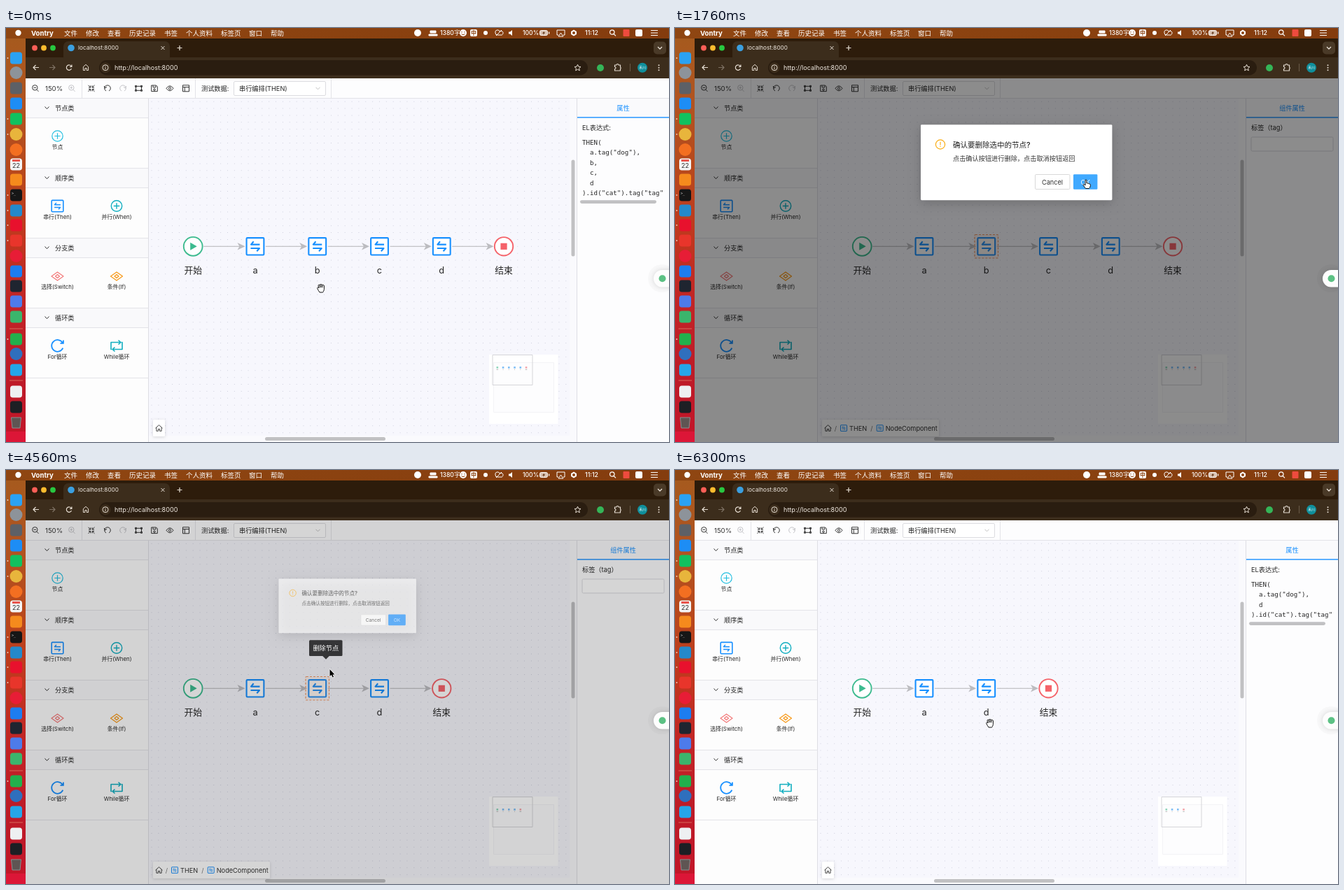
These frames come from a looping animation (947x592 px, 6330 ms). An HTML page with a canvas:

```html
<!DOCTYPE html>
<html lang="zh">
<head>
<meta charset="utf-8">
<title>Flow editor</title>
<style>
html, body { margin: 0; width: 100%; height: 100%; overflow: hidden; background: #fff; }
canvas { display: block; width: 947px; height: 592px; }
</style>
</head>
<body>
<canvas id="stage"></canvas>
<script>
const W = 947, H = 592, LOOP = 6330;
const canvas = document.getElementById('stage');
const ctx = canvas.getContext('2d');
const dpr = window.devicePixelRatio || 1;
canvas.width = W * dpr;
canvas.height = H * dpr;

const SANS = 'Inter, "Noto Sans CJK SC", "Noto Sans CJK", sans-serif';
const MONO = '"DejaVu Sans Mono", monospace';
const BLUE = '#1890ff', INK = '#262626', RULE = '#e3e3e8', TEAL = '#12aec0';

// ---------- drawing helpers ----------
function text(s, x, y, size, color = INK, { weight = 400, align = 'left', font = SANS } = {}) {
  ctx.font = `${weight} ${size}px ${font}`;
  ctx.textAlign = align;
  ctx.fillStyle = color;
  ctx.fillText(s, x, y + size * 0.37);
}
function rect(x, y, w, h, color) {
  ctx.fillStyle = color;
  ctx.fillRect(x, y, w, h);
}
function box(x, y, w, h, r, fill, stroke, lw = 1) {
  ctx.beginPath();
  ctx.roundRect(x, y, w, h, r);
  if (fill) { ctx.fillStyle = fill; ctx.fill(); }
  if (stroke) { ctx.strokeStyle = stroke; ctx.lineWidth = lw; ctx.stroke(); }
}
function circle(x, y, r, fill, stroke, lw = 1) {
  ctx.beginPath();
  ctx.arc(x, y, r, 0, 7);
  if (fill) { ctx.fillStyle = fill; ctx.fill(); }
  if (stroke) { ctx.strokeStyle = stroke; ctx.lineWidth = lw; ctx.stroke(); }
}
function icon(d, x, y, stroke, lw = 1, fill) {
  const p = new Path2D(d);
  ctx.save();
  ctx.translate(x, y);
  ctx.lineJoin = 'round';
  if (fill) { ctx.fillStyle = fill; ctx.fill(p); }
  if (stroke) { ctx.strokeStyle = stroke; ctx.lineWidth = lw; ctx.stroke(p); }
  ctx.restore();
}
function shadow(color, blur, dy, draw) {
  ctx.save();
  ctx.shadowColor = color;
  ctx.shadowBlur = blur * dpr;
  ctx.shadowOffsetY = dy * dpr;
  draw();
  ctx.restore();
}
function gradient(x0, y0, x1, y1, stops) {
  const g = ctx.createLinearGradient(x0, y0, x1, y1);
  stops.forEach((c, i) => g.addColorStop(i / (stops.length - 1), c));
  return g;
}

// ---------- timing helpers ----------
const clamp = v => Math.max(0, Math.min(1, v));
const smooth = v => v * v * (3 - 2 * v);
const within = (t, spans) => spans.some(([a, b]) => t >= a && t < b);
function bezier(x1, y1, x2, y2) {
  const at = (a, b, u) => 3 * (1 - u) ** 2 * u * a + 3 * (1 - u) * u * u * b + u ** 3;
  return x => {
    let lo = 0, hi = 1;
    for (let i = 0; i < 20; i++) {
      const mid = (lo + hi) / 2;
      if (at(x1, x2, mid) < x) lo = mid; else hi = mid;
    }
    return at(y1, y2, lo);
  };
}
const circOut = bezier(0.08, 0.82, 0.17, 1);
const circInOut = bezier(0.78, 0.14, 0.15, 0.86);

// ---------- timeline ----------
const DIALOGS = [{ open: 1080, close: 2115 }, { open: 4450, close: 5375 }];
const HOVERS = [[360, 1040], [3020, 4420], [6090, 6225]];
const TOOLTIP = [4180, 4680];
const PATH = [
  [0, 450, 372], [100, 450, 372], [630, 459.5, 292], [1300, 459.5, 292], [1580, 513, 265],
  [1750, 587, 218], [1930, 588, 217], [2740, 588, 217], [3160, 455, 302], [3300, 455, 302],
  [3530, 462, 299], [3700, 462, 299], [3860, 459, 292], [4000, 459, 292], [4180, 462.5, 285],
  [4680, 462.5, 285], [5180, 584, 225], [5500, 584, 225], [5980, 512, 281], [6100, 458, 312],
  [6300, 450, 362], [LOOP, 450, 362]
];
const POINTERS = [
  [0, 'grab'], [560, 'hand'], [1040, 'arrow'], [1710, 'hand'], [2400, 'grab'], [3790, 'hand'],
  [4430, 'arrow'], [5080, 'hand'], [5580, 'arrow'], [5680, 'grab']
];
function cursorAt(t) {
  const i = Math.max(1, PATH.findIndex(k => k[0] > t));
  const [t0, x0, y0] = PATH[i - 1], [t1, x1, y1] = PATH[i];
  const p = smooth(clamp((t - t0) / (t1 - t0)));
  const kind = POINTERS.filter(k => k[0] <= t).pop()[1];
  return { x: x0 + (x1 - x0) * p, y: y0 + (y1 - y0) * p, kind };
}
function dialogAt(t) {
  const d = DIALOGS.find(d => t >= d.open && t < d.close + 300);
  if (!d) return null;
  if (t >= d.close) {
    const p = (t - d.close) / 300;
    return { mask: 1 - p, zoom: 1 - circInOut(p), focus: 1 };
  }
  return {
    mask: clamp((t - d.open) / 300),
    zoom: circOut(clamp((t - d.open - 75) / 300)),
    focus: clamp((t - d.open - 250) / 150)
  };
}

// ---------- desktop ----------
const MENUS = [['文件', 83], ['修改', 114], ['查看', 145], ['历史记录', 176], ['书签', 226],
  ['个人资料', 257], ['标签页', 307], ['窗口', 347], ['帮助', 378]];
function menuBar() {
  rect(0, 0, W, 15, gradient(0, 0, W, 0, ['#8f4612', '#8b4210', '#843c0e']));
  circle(17.5, 7, 4.2, '#fff');
  text('Vontry', 36, 7.2, 9.6, '#fff', { weight: 700 });
  for (const [label, x] of MENUS) text(label, x, 7, 9.5, '#fff', { weight: 500 });
  circle(588, 7, 5, '#fff');
  icon('M-4-3H4V0H-4ZM-6 2H6V4H-6Z', 610, 7, '#fff', 1, '#fff');
  text('1380字', 620, 7, 8.6, '#fff', { weight: 500 });
  circle(653, 7, 5, '#fff');
  icon('M-2-2V-.5M2-2V-.5M-2.5 1.5Q0 4 2.5 1.5', 653, 7, '#8b4210');
  box(663, 2, 10, 10, 2, '#fff');
  text('中', 668, 7, 8, '#8b4210', { align: 'center', weight: 700 });
  circle(685, 7, 3, '#fff');
  icon('M-5 0A3 3 0 0 1 1-2A3 3 0 1 1 2 3H-2A3 3 0 0 1-5 0M-4 4L4-4', 704, 7, '#fff');
  icon('M-3-1.5H-1L2-4V4L-1 1.5H-3Z', 721, 7, null, 1, '#fff');
  text('100%', 738, 7, 8.6, '#fff', { weight: 500 });
  box(762.5, 3.5, 11, 7, 2, '#d9c2b2', '#fff');
  icon('M1-3L-2 .7H0L-1 3.5L2-.7H0Z', 768, 7, null, 1, '#5a2c0c');
  rect(775, 5.5, 1.3, 3, '#fff');
  icon('M-3 3H-5V-4H6V3H4M-3 5L.5 0L4 5Z', 792, 7, '#fff');
  icon('M-4-2L0-4.5L4-2V2L0 4.5L-4 2Z', 811, 7, null, 1, '#fff');
  circle(811, 7, 2, '#8b4210');
  text('11:12', 827, 7, 8.8, '#fff', { weight: 500 });
  icon('M2-1A3.2 3.2 0 1 1-4.4-1A3.2 3.2 0 1 1 2-1M1 1.4L4 4.4', 867, 7, '#fff', 1.2);
  box(881.5, 2, 9, 10, 1, '#ee4b3e');
  box(899, 2, 10, 10, 2, '#fff');
  icon('M-5-3.5H5M-5 0H5M-5 3.5H5', 926, 7, '#fff', 1.2);
}

const DOCK = [
  [43, '#2ba2f3'], [64, '#8d939a', 1], [86, '#5d6066'], [108, '#1d8df5'], [130, '#11c15f'],
  [152, '#e8b53c', 1], [174, '#f36f21', 1], [195, '#f4f4f4'], [217, '#f58a1d'], [239, '#161616'],
  [261, '#2489ca'], [282, '#e8112d'], [304, '#e8352b'], [326, '#e71d36', 1], [348, '#1c7df0'],
  [369, '#1f2530'], [391, '#4d7bea'], [413, '#3bb56c'], [445, '#22b04c'], [466, '#2f6fbd', 1],
  [489, '#25a6e8'], [520, '#eef0f2'], [542, '#1d1f24']
];
function dock() {
  rect(0, 15, 28, H - 15, gradient(0, 15, 0, H,
    ['#a65a1e', '#b25320', '#b8481c', '#c0361f', '#c22326', '#bd1b28', '#c31529']));
  rect(0, 577, 28, 15, '#dc1637');
  for (const [y, color, round] of DOCK) {
    if (round) circle(14.5, y, 9, color);
    else box(6, y - 8.5, 17, 17, 3.8, color);
  }
  rect(9, 188, 11, 3, '#e8554d');
  text('22', 14.5, 197, 9, '#333', { align: 'center' });
  text('>_', 8, 236, 5, '#eee', { font: MONO });
  icon('M-7-7H7L5.5 8H-5.5Z', 14.5, 564, '#8a8f90', 1, '#5f5553');
  rect(5, 429.5, 19, 1, '#d96b5d');
  rect(5, 503.5, 19, 1, '#d96b5d');
  for (const y of [43, 130, 152, 239, 261, 282, 304, 445]) circle(2.5, y, 0.9, '#f3d6c8');
}

function browser() {
  rect(28, 15, W - 28, 28, '#2d1c0b');
  rect(28, 42, W - 28, 30, '#3c2d1c');
  box(82, 19, 152, 30, 7, '#3c2d1c');
  ['#ff5f57', '#febc2e', '#28c840'].forEach((c, i) => circle(41 + i * 13, 28.5, 3.9, c));
  circle(93, 28.5, 4.8, '#3b9fe0');
  text('localhost:8000', 103, 28.3, 8.2, '#f3ece4');
  icon('M-2.5-2.5L2.5 2.5M2.5-2.5L-2.5 2.5', 224, 28.5, '#e8e0d6');
  icon('M-3.5 0H3.5M0-3.5V3.5', 248, 28.5, '#e8e0d6', 1.2);
  box(925, 19.5, 18, 18, 5, '#4a3a28');
  icon('M-3-1.5L0 1.5L3-1.5', 934, 28.5, '#f0e8de', 1.2);
  const light = '#e6ddd2';
  icon('M4 0H-4M-.5-3.5L-4 0L-.5 3.5', 43, 56.5, light, 1.2);
  icon('M-4 0H4M.5-3.5L4 0L.5 3.5', 66, 56.5, '#7d7062', 1.2);
  icon('M3.4-1.5A3.7 3.7 0 1 0 3.5 1.5M3.9-4V-1H1', 90, 56.5, light, 1.2);
  icon('M-3.6 4V-1L0-4.2L3.6-1V4H1.2V1H-1.2V4Z', 114, 56.5, light);
  box(133, 46, 698, 21.5, 10.7, '#2a1d10');
  circle(142, 56.7, 7.5, '#3c2d1c');
  circle(142, 56.7, 4, null, light);
  icon('M0-.5V2.2M0-2.3V-1.3', 142, 56.7, light);
  text('http://localhost:8000', 155, 56.6, 9.1, '#f3ece4');
  icon('M0-4.5L1.3-1.5L4.5-1.2L2.1 1L2.8 4.2L0 2.5L-2.8 4.2L-2.1 1L-4.5-1.2L-1.3-1.5Z', 816.5, 56.7, light);
  circle(849, 57, 5, '#35b558');
  icon('M-4-3H-1.5A1.5 1.5 0 0 1 1.5-3H4V0A1.5 1.5 0 0 1 4 2.5V5H-4V2.5A1.5 1.5 0 0 0-4-.5Z', 873.5, 56, light, 1.2);
  rect(891, 51, 1, 11, '#6a5a48');
  circle(909, 56.7, 7, '#0f8f9c');
  text('禾川', 909, 56.5, 5, '#fff', { align: 'center' });
  for (const dy of [-3.5, 0, 3.5]) circle(932.5, 56.7 + dy, 1, light);
}

// ---------- page ----------
const SWAP = 'M6.5-2.7H-6L-2.3-7M-6.5 2.7H6L2.3 7';
const SMALL_SWAP = 'M4.4-1.8H-4L-1.6-4.6M-4.4 1.8H4L1.6 4.6';
const MAGNIFIER = 'M3-1A3.7 3.7 0 1 1-4.4-1A3.7 3.7 0 1 1 3-1M2 2L4.5 4.5M-2.5-1H1.1';
const HOME = 'M-5 0L0-4.6L5 0M-3.6-1V4H-1V1.2H1V4H3.6V-1';
const DIAMOND = 'M-8.5 0L0-6L8.5 0L0 6ZM-3 0L0-2.4L3 0L0 2.4Z';

function toolbar() {
  rect(28, 72, W - 28, 28, '#fdfdfe');
  rect(28, 100, W - 28, 1, RULE);
  for (const x of [108, 270, 464]) rect(x, 72, 1, 28, RULE);
  icon(MAGNIFIER, 42, 86.3, '#333');
  text('150%', 56, 86.3, 9.6, '#333');
  icon(MAGNIFIER + 'M-.7-2.8V.8', 94, 86.3, '#c4c4c8');
  icon('M-4.5-4.5L-1.2-1.2M4.5-4.5L1.2-1.2M-4.5 4.5L-1.2 1.2M4.5 4.5L1.2 1.2M-4-1.2H-1.2V-4M4-1.2H1.2V-4M-4 1.2H-1.2V4M4 1.2H1.2V4', 122, 86.3, '#333');
  icon('M-2 4A4.3 4.3 0 1 1 2 4M-4.8-3L-3.6 0L-1-1.6', 145, 86, '#333');
  icon('M2 4A4.3 4.3 0 1 0-2 4M4.8-3L3.6 0L1-1.6', 167, 86, '#c4c4c8');
  icon('M-4-3H4V3H-4ZM-5-4H-3V-2H-5ZM3-4H5V-2H3ZM-5 2H-3V4H-5ZM3 2H5V4H3Z', 189.5, 86.3, '#333');
  icon('M-4.3-4.3H2.5L4.3-2.5V4.3H-4.3ZM-2-4V-1.5H2V-4M1.3 1.8A1.3 1.3 0 1 1-1.3 1.8A1.3 1.3 0 1 1 1.3 1.8', 212, 86.3, '#333');
  icon('M-5 0Q0-7 5 0Q0 7-5 0ZM1.6 0A1.6 1.6 0 1 1-1.6 0A1.6 1.6 0 1 1 1.6 0', 234, 86.3, '#333');
  icon('M-4.5-4.5H4.5V4.5H-4.5ZM-4.5-1.7H4.5M-1.7-1.7V4.5', 257, 86.3, '#333');
  text('测试数据:', 279, 86.3, 9.2);
  box(325.5, 76.5, 131, 20, 1.5, '#fff', '#dcdce0');
  text('串行编排(THEN)', 333, 86.3, 9.2);
  icon('M-3-1.5L0 1.5L3-1.5', 445.5, 86.3, '#bfbfbf');
}

function sidebar() {
  rect(28, 101, 176, H - 101, '#fdfdfd');
  ['节点类', '顺序类', '分支类', '循环类'].forEach((title, i) => {
    const y = 100 + i * 100;
    rect(28, y, 176, 28, '#f9f9fb');
    rect(28, y, 176, 1, RULE);
    rect(28, y + 28, 176, 1, RULE);
    icon('M-3-1.5L0 1.7L3-1.5', 58.5, y + 14, '#333');
    text(title, 70, y + 14.3, 9.2);
  });
  rect(28, 500, 176, 1, RULE);
  rect(203, 101, 1, H - 101, '#dedee4');
  const plus = 'M-4.2 0H4.2M0-4.2V4.2';
  const label = (s, x, y) => text(s, x, y, 7.9, INK, { align: 'center' });
  circle(73.5, 154.5, 7.7, null, '#23bfe0', 1.2);
  icon(plus, 73.5, 154.5, '#23bfe0', 1.2);
  label('节点', 73.5, 170.3);
  box(65.2, 246.4, 16.6, 16.4, 1, null, BLUE, 1.6);
  icon(SMALL_SWAP, 73.5, 254.6, BLUE, 1.5);
  label('串行(Then)', 73.5, 270.3);
  circle(158, 254.5, 7.7, null, TEAL, 1.4);
  icon(plus, 158, 254.5, TEAL, 1.4);
  label('并行(When)', 158, 270.3);
  icon(DIAMOND, 73.5, 355, '#f37c7c', 1.3);
  label('选择(Switch)', 73.5, 370.3);
  icon(DIAMOND, 158, 355, '#f79a1b', 1.3);
  label('条件(If)', 158, 370.3);
  icon('M7.2-4.6A8.4 8.4 0 1 0 7.8 3.2M8.4-8V-3.6H4', 73.5, 454.5, BLUE, 1.8);
  label('For循环', 73.5, 470.3);
  icon('M-8-1V-5H5M2.5-8L6-5L2.5-2M8 1V5H-5M-2.5 8L-6 5L-2.5 2M8 1V-5H7M-8-1V5H-7', 158, 454.5, TEAL, 1.6);
  label('While循环', 158, 470.3);
}

const STEP = 88.77, NODE_Y = 312.3;
const nodeX = i => 267.2 + STEP * i;
const dots = new Path2D();
for (let x = 208; x < 805; x += STEP / 9)
  for (let y = 105.2; y < 583; y += STEP / 9) dots.rect(x - 0.5, y - 0.5, 1, 1);

function flow(ids, selected, hovered) {
  rect(204, 101, 611, H - 101, '#f7f7fd');
  ctx.fillStyle = '#cfd0de';
  ctx.fill(dots);
  const last = ids.length + 1;
  for (let i = 0; i < last; i++) {
    const from = nodeX(i) + 15, tip = nodeX(i + 1) - 14.5;
    rect(from, NODE_Y - 0.6, tip - from - 7, 1.2, '#bfbfc2');
    icon('M0 0L-11-5.2L-8 0L-11 5.2Z', tip, NODE_Y, null, 1, '#bcbcc0');
  }
  const label = (s, i) => text(s, nodeX(i), 346.3, 12.8, INK, { align: 'center' });
  circle(nodeX(0), NODE_Y, 13.4, '#fff', '#3dbb8f', 1.9);
  icon('M-4-5.5L5.5 0L-4 5.5Z', nodeX(0), NODE_Y, null, 1, '#3dbb8f');
  label('开始', 0);
  if (hovered) for (const side of [-1, 1]) {
    circle(nodeX(2) + side * 23.6, NODE_Y, 8.8, '#d2d2d6');
    icon('M-2.2-4.5L2.2 0L-2.2 4.5', nodeX(2) + side * 23.6 + (side < 0 ? 0.3 : 0), NODE_Y, null);
    icon(side < 0 ? 'M2-4.5L-2.3 0L2 4.5' : 'M-2-4.5L2.3 0L-2 4.5', nodeX(2) + side * 23.6, NODE_Y, '#555', 1.5);
  }
  ids.forEach((id, i) => {
    box(nodeX(i + 1) - 12.4, NODE_Y - 12.2, 24.8, 24.4, 1.2, '#fff', BLUE, 2.1);
    icon(SWAP, nodeX(i + 1), NODE_Y, BLUE, 2.1);
    label(id, i + 1);
  });
  circle(nodeX(last), NODE_Y, 13.2, '#fff', '#f5636a', 1.9);
  rect(nodeX(last) - 4.6, NODE_Y - 4.6, 9.2, 9.2, '#f5636a');
  label('结束', last);
  if (selected) {
    ctx.setLineDash([3, 2]);
    box(428, 295.5, 33.5, 33.5, 1, 'rgba(250,150,90,.08)', '#f19a68', 1.2);
    ctx.setLineDash([]);
  }
  if (hovered) {
    shadow('rgba(0,0,0,.16)', 7, 1, () => box(420, 274, 49.5, 23, 3, '#fff'));
    rect(445, 275, 1, 21, '#ececf0');
    icon('M-5 2.8L-4.4-.2L2.4-6.5L5-4L-1.8 2.4ZM-6.5 6.3H6.5', 433, 285.5, '#333', 1.3);
    icon('M-6.5-4H6.5M-2.8-4V-6.5H2.8V-4M-4.8-4L-4.3 6.5H4.3L4.8-4', 457, 285.5, '#f0434a', 1.4);
  }
  miniMap(last);
  rect(805, 101, 10, H - 101, '#fafafd');
  rect(204, 583, 611, 9, '#fafafd');
  box(807.5, 188.5, 5, 138, 2.5, '#c1c1c3');
  box(370, 585, 172, 5, 2.5, '#c1c1c3');
  crumbs(selected);
}

function miniMap(last) {
  rect(690, 467, 98.5, 99, '#fff');
  box(696.5, 478.5, 86, 71, 0, '#fdfdfe', '#f3f3f6');
  box(695, 467.5, 57, 43, 0, null, '#d5d5d9');
  for (let i = 0; i <= last; i++) {
    const x = 701.8 + i * 8.25, end = i === last;
    rect(x - 1.3, 484.2, 2.6, 2.6, end ? '#f5a5aa' : i ? '#7cbdf5' : '#8fd6bb');
    rect(x - (end || !i ? 1.3 : 0.5), 488, end || !i ? 2.6 : 1, 1, '#bbb');
  }
}

function crumbs(selected) {
  shadow('rgba(0,0,0,.15)', 4, 1, () => box(210, 560, selected ? 167 : 17, 24, 1.5, '#fff'));
  icon(HOME, 218.5, 572.3, '#444');
  if (!selected) return;
  for (const [name, x] of [['THEN', 241], ['NodeComponent', 292.7]]) {
    text('/', x - 11.7, 572.2, 9.2, '#777', { align: 'center' });
    box(x - 4.5, 567.8, 9, 8.6, 0.5, null, BLUE, 1);
    icon('M2.4-1H-2.3L-1-2.5M-2.4 1H2.3L1 2.5', x, 572.1, BLUE, 0.9);
    text(name, x + 8, 572.2, 9.2, '#333');
  }
}

function panel(ids, selected) {
  rect(815, 101, 132, H - 101, '#fdfdfe');
  rect(815, 101, 1, H - 101, '#dedee4');
  rect(816, 101, 131, 26, '#fafafc');
  rect(816, 127.2, 131, 1.4, BLUE);
  text(selected ? '组件属性' : '属性', 881.5, 114.3, 9.2, BLUE, { weight: 500, align: 'center' });
  if (selected) {
    text('标签（tag）', 823, 142.5, 9.2);
    box(823, 156, 117, 20, 1.5, '#fff', '#d9d9de');
    return;
  }
  text('EL表达式:', 823, 142.5, 9.2);
  const items = ids.map((id, i) =>
    '  ' + id + (id === 'a' ? '.tag("dog")' : '') + (i < ids.length - 1 ? ',' : ''));
  const lines = ['THEN(', ...items, ').id("cat").tag("tag")'];
  ctx.save();
  ctx.beginPath();
  ctx.rect(820, 150, 120, 120);
  ctx.clip();
  lines.forEach((s, i) => text(s, 823, 163.3 + i * 14.5, 9.2, INK, { font: MONO }));
  ctx.restore();
  box(820, 159.2 + lines.length * 14.5, 109, 4.8, 2.4, '#c1c1c3');
}

// ---------- overlays ----------
function dialog({ mask, zoom, focus }) {
  rect(28, 72, W - 28, H - 72, `rgba(0,0,0,${0.45 * mask})`);
  if (zoom <= 0) return;
  const s = 0.2 + 0.8 * zoom, ox = 487.6, oy = 200;
  ctx.save();
  ctx.globalAlpha = zoom;
  ctx.translate(ox, oy);
  ctx.scale(s, s);
  ctx.translate(-ox, -oy);
  shadow('rgba(0,0,0,.18)', 16, 4, () => box(351, 138.2, 273.4, 108, 1.4, '#fff'));
  circle(379, 166.5, 6.6, null, '#faad14', 1.2);
  icon('M0-3.7V1M0 2.3V3.6', 379, 166.5, '#faad14', 1.2);
  text('确认要删除选中的节点?', 397, 167, 10.5, '#1f1f1f', { weight: 500 });
  text('点击确认按钮进行删除，点击取消按钮返回', 397, 186.7, 9.2, '#333');
  box(514.5, 209.5, 49.5, 21, 1.4, '#fff', '#d9d9d9');
  text('Cancel', 539, 220.2, 9.2, '#333', { align: 'center' });
  box(569, 209.2, 34.4, 21.6, 1.4, `rgb(${24 + 40 * focus},${144 + 25 * focus},255)`);
  text('OK', 586.2, 220.2, 9.2, '#fff', { align: 'center' });
  ctx.restore();
}

function tooltip(t) {
  const [a, b] = TOOLTIP;
  const alpha = Math.min(clamp((t - a) / 100), clamp((b + 100 - t) / 100));
  if (!alpha) return;
  ctx.save();
  ctx.globalAlpha = alpha;
  box(433, 243.3, 47.5, 22.7, 1.5, '#353537');
  icon('M-5 0H5L0 5Z', 457, 265.8, null, 1, '#353537');
  text('删除节点', 456.8, 254.7, 9.2, '#fff', { align: 'center' });
  ctx.restore();
}

function floatingButton() {
  circle(937, 358, 20, 'rgba(0,0,0,.018)');
  shadow('rgba(0,0,0,.14)', 6, 0, () => box(925, 346, 40, 24.5, 12.2, '#fdfdfd'));
  circle(937.5, 358.2, 5, '#5cc184');
}

const CURSORS = {
  arrow: 'M0 0V10L2.3 8L4 11.6L5.5 11L4 7.4H7Z',
  hand: 'M-1 0C-1-1.4 1-1.4 1 0V4C2 3.3 3 3.6 3 4.6C4 4 5 4.4 5 5.4C6 5 6.6 5.6 6.5 6.5L6 9C5.7 10 5 11 4.5 11.5H-.5C-1.5 10-3 8.5-4 6.5C-4.2 5.4-2.8 5-1 7Z',
  grab: 'M-5 1C-6-1-4-2-3 0L-4-3.6C-4-5.2-2.5-5.2-2-4C-2-6-.2-6 0-4.6C.4-6 2-5.6 2-4C3-5.2 4.6-4.6 4.4-3L4.4 1.5C4.2 4 3 5 2.6 6H-2C-3 4.6-4 3-5 1ZM-2-4L-1.4-.8M0-4.6L.2-.9M2-4L1.9-.8'
};
function cursor({ x, y, kind }) {
  if (kind === 'arrow') icon(CURSORS.arrow, x, y, '#fff', 1.4);
  icon(CURSORS[kind], x, y, kind === 'arrow' ? null : '#111', 1, kind === 'arrow' ? '#000' : '#fff');
}

function render(t) {
  ctx.setTransform(dpr, 0, 0, dpr, 0, 0);
  const ids = [...(t < DIALOGS[0].close ? 'abcd' : t < DIALOGS[1].close ? 'acd' : 'ad')];
  const selected = within(t, DIALOGS.map(d => [d.open - 40, d.close]));
  const hovered = within(t, HOVERS) && !selected;
  const modal = dialogAt(t);
  menuBar();
  dock();
  browser();
  flow(ids, selected, hovered);
  toolbar();
  sidebar();
  panel(ids, selected);
  if (modal) dialog(modal);
  tooltip(t);
  floatingButton();
  cursor(cursorAt(t));
}

const start = performance.now();
function tick() {
  render((performance.now() - start) % LOOP);
  requestAnimationFrame(tick);
}
tick();
</script>
</body>
</html>
```
